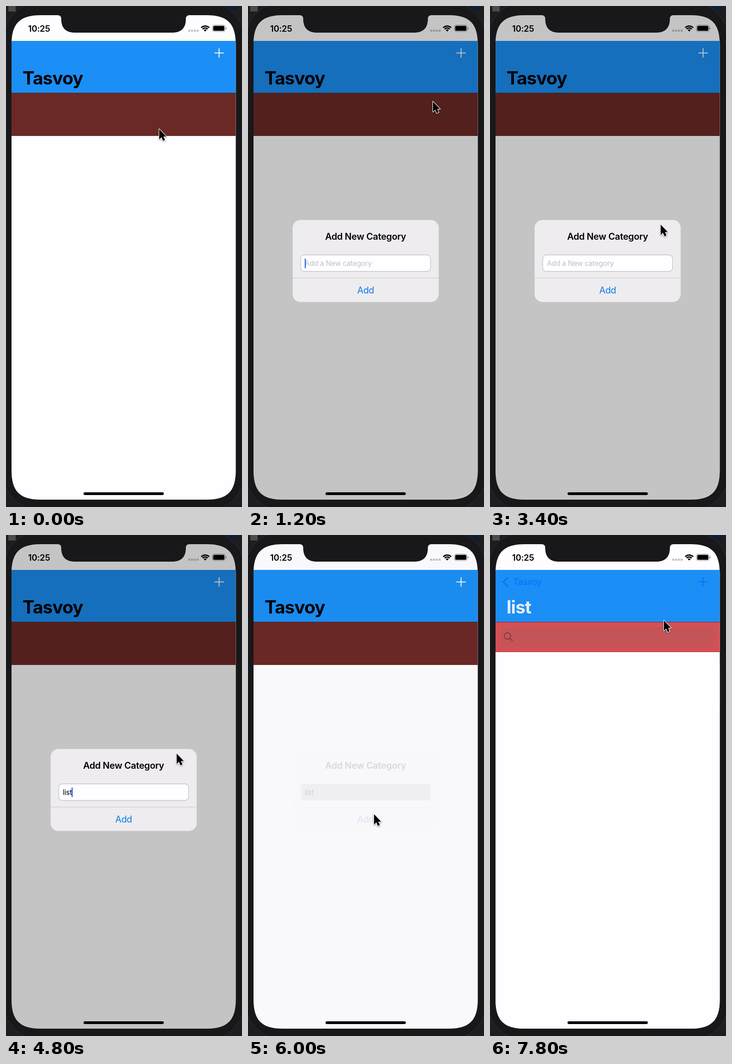
Animation, 513 px wide and 1091 px high, one loop 8000 ms. Source, as an HTML page with a canvas:

```html
<!DOCTYPE html>
<html lang="en">
<head>
<meta charset="utf-8">
<style>
  html, body { margin: 0; width: 100%; height: 100%; overflow: hidden; background: #18171a; }
  canvas { display: block; }
</style>
</head>
<body>
<canvas id="stage" width="513" height="1091"></canvas>
<script>
const ctx = document.getElementById('stage').getContext('2d');
const APP = 'Tasvoy';
const LOOP = 8000, STEP = 200;
const LEFT = 12, RIGHT = 499.5, TOP = 20, BOTTOM = 1075, WIDTH = RIGHT - LEFT;
const BLUE = '#1b8ff5', TINT = '#0672f5', RED = '#d55055', MAROON = '#6b2926', PAPER = '#fefdff';

// Pointer stops: step, x, y
const STOPS = [
  [0, 333, 267], [3, 457, 104], [5, 457, 104], [6, 402, 207], [9, 371, 475],
  [24, 371, 475], [27, 274, 607], [31, 274, 607], [34, 149, 337],
  [36, 149, 337], [39, 378, 185]
];
const mix = (a, b, p) => a + (b - a) * p;

function withState(draw) { ctx.save(); draw(); ctx.restore(); }

function rect(x, y, w, h, color) {
  ctx.fillStyle = color;
  ctx.fillRect(x, y, w, h);
}

function pill(x, y, w, h, r, fill, stroke, lineWidth = 1) {
  ctx.beginPath();
  ctx.roundRect(x, y, w, h, r);
  if (fill) { ctx.fillStyle = fill; ctx.fill(); }
  if (stroke) { ctx.strokeStyle = stroke; ctx.lineWidth = lineWidth; ctx.stroke(); }
}

function line(points, color, width) {
  ctx.beginPath();
  points.forEach(([x, y]) => ctx.lineTo(x, y));
  ctx.strokeStyle = color;
  ctx.lineWidth = width;
  ctx.stroke();
}

function text(str, x, y, size, color, { weight = 400, track = -0.01, align = 'left' } = {}) {
  ctx.font = `${weight} ${size}px Inter, "Liberation Sans", sans-serif`;
  ctx.letterSpacing = `${size * track}px`;
  ctx.textAlign = align;
  ctx.fillStyle = color;
  ctx.fillText(str, x, y);
}

function screenPath() {
  const e = 64, k = 18;
  ctx.beginPath();
  ctx.moveTo(LEFT, TOP + e);
  ctx.bezierCurveTo(LEFT, TOP + k, LEFT + k, TOP, LEFT + e, TOP);
  ctx.lineTo(112, TOP);
  ctx.quadraticCurveTo(120, TOP, 120, 28);
  ctx.bezierCurveTo(120, 48, 130, 58, 150, 58);
  ctx.lineTo(361, 58);
  ctx.bezierCurveTo(381, 58, 391, 48, 391, 28);
  ctx.quadraticCurveTo(391, TOP, 399, TOP);
  ctx.lineTo(RIGHT - e, TOP);
  ctx.bezierCurveTo(RIGHT - k, TOP, RIGHT, TOP + k, RIGHT, TOP + e);
  ctx.lineTo(RIGHT, BOTTOM - e);
  ctx.bezierCurveTo(RIGHT, BOTTOM - k, RIGHT - k, BOTTOM, RIGHT - e, BOTTOM);
  ctx.lineTo(LEFT + e, BOTTOM);
  ctx.bezierCurveTo(LEFT + k, BOTTOM, LEFT, BOTTOM - k, LEFT, BOTTOM - e);
  ctx.closePath();
}

function device() {
  rect(0, 0, 513, 1091, '#1c1d20');
  rect(420, 0, 83, 11, '#101c30');
  rect(5, 0, 16, 12, '#4b4b4e');
  pill(-6, -9, 525, 1109, 84, '#18171a', '#303034');
}

function statusBar() {
  text('10:25', 48, 55.5, 18.5, '#000', { weight: 600 });
  for (let i = 0; i < 4; i++) pill(396 + i * 6.1, 51.5, 4.6, 4.4, 1, '#c3c2c5');
  for (const r of [4.5, 9, 13.3]) {
    ctx.beginPath();
    ctx.arc(433, 55.5, r - (r < 5 ? 2.2 : 1.4), -Math.PI * 0.76, -Math.PI * 0.24);
    ctx.strokeStyle = '#000';
    ctx.lineWidth = r < 5 ? 4.4 : 2.8;
    ctx.stroke();
  }
  pill(448.7, 41.5, 27.6, 14.2, 4, null, '#8e8d90');
  pill(450.4, 43.2, 24.2, 10.8, 2.6, '#000');
  pill(477.6, 46.5, 1.7, 4.4, 1, '#8e8d90');
}

function plus(color, alpha) {
  ctx.globalAlpha = alpha;
  line([[453, 102.3], [473.5, 102.3]], color, 2);
  line([[463.2, 92], [463.2, 112.5]], color, 2);
  ctx.globalAlpha = 1;
}

function navBar(push) {
  rect(LEFT, 76, WIDTH, 113, BLUE);
  plus('#f5f9ff', 1 - push);
  plus(TINT, push);

  // The large title shrinks into the back button while the next one slides in.
  const x = mix(36, 50, push), y = mix(170.5, 109, push);
  const fade = Math.min(1, push * 1.3);
  if (push < 1) {
    ctx.globalAlpha = 1 - fade;
    text(APP, x, y, mix(39, 20, push), '#000', { weight: 700, track: -0.025 });
  }
  if (push > 0) {
    ctx.globalAlpha = push;
    text(APP, x, y, mix(39, 19.5, push), TINT, { track: -0.02 });
    line([[39, 92.5], [29, 102.5], [39, 112.5]], TINT, 2.7);
    text('list', mix(546, 36, push), 170.5, 39, '#e8eef6', { weight: 700, track: -0.025 });
  }
  ctx.globalAlpha = 1;
}

function categories(hasList, selected, push) {
  const shift = -0.3 * WIDTH * push;
  rect(LEFT, 189, WIDTH, 94, MAROON);
  rect(LEFT, 189, WIDTH, 1, 'rgba(30,20,40,.45)');
  if (!hasList) return;
  rect(LEFT, 283, WIDTH, 95, selected ? '#c7c5cd' : RED);
  text('list', 36 + shift, 337.5, 19.5, selected ? '#eae8ee' : '#f6eeee');
}

function items(push) {
  const x = (1 - push) * WIDTH;
  const edge = LEFT + x;
  if (push < 1) {
    rect(LEFT, 189, x, BOTTOM - 189, `rgba(0,0,20,${0.06 * push})`);
    const shadow = ctx.createLinearGradient(edge - 11, 0, edge, 0);
    shadow.addColorStop(0, 'rgba(0,0,20,0)');
    shadow.addColorStop(1, 'rgba(0,0,20,.05)');
    rect(edge - 11, 189, 11, BOTTOM - 189, shadow);
  }
  withState(() => {
    ctx.translate(x, 0);
    rect(LEFT, 189, WIDTH, BOTTOM - 189, PAPER);
    rect(LEFT, 189, WIDTH, 66, RED);
    rect(LEFT, 189, WIDTH, 1.5, 'rgba(70,40,80,.55)');
    rect(LEFT, 254, WIDTH, 1, 'rgba(110,30,40,.4)');
    pill(22, 201, 468, 43, 13, '#c45458');
    ctx.beginPath();
    ctx.arc(38, 220, 7, 0, 7);
    ctx.strokeStyle = '#84343b';
    ctx.lineWidth = 1.8;
    ctx.stroke();
    line([[43, 225], [49, 230.5]], '#84343b', 2);
  });
}

function alertBox(step, alpha) {
  const closing = step >= 30;
  const pressed = step === 29;
  const typed = 'list'.slice(0, Math.max(0, step - 19));
  const caretOn = !closing && (step >= 20 || (step - 4) % 5 < 3);
  withState(() => {
    ctx.globalAlpha = alpha;
    if (!closing) {
      const scale = 1 + 0.15 * (1 - alpha);
      ctx.translate(255.7, 555);
      ctx.scale(scale, scale);
      ctx.translate(-255.7, -555);
    }
    pill(97, 466, 317.5, 178.5, 17, '#eeecef');
    if (pressed) pill(97, 592, 317.5, 52.5, [0, 0, 17, 17], '#d5d4d5');
    rect(97, 592, 317.5, 1, '#c6c5c9');
    text('Add New Category', 255.7, 508.5, 19.8, '#000', { weight: 600, track: -0.014, align: 'center' });
    pill(114.7, 542, 282, 36, 7.5, closing ? '#b0afb3' : PAPER, closing ? null : '#c5c4c8', 1.3);
    if (typed) text(typed, 123.5, 566.2, 15.5, '#000', { track: -0.015 });
    else text('Add a New category', 123.5, 566.2, 15.5, '#c0bfc4', { track: -0.015 });
    if (caretOn) {
      const advance = typed ? ctx.measureText(typed).width - 0.6 : 0;
      pill(123.2 + advance, 550, 2.6, 21, 1.2, '#3273dc');
    }
    text('Add', 255.7, 626, 19.6, '#0a7bea', { track: -0.02, align: 'center' });
  });
}

function pointerAt(step) {
  const i = STOPS.findIndex(stop => stop[0] >= step);
  const b = STOPS[i], a = STOPS[Math.max(0, i - 1)];
  const p = b === a ? 0 : (step - a[0]) / (b[0] - a[0]);
  const ease = p * p * (3 - 2 * p);
  return [mix(a[1], b[1], ease), mix(a[2], b[2], ease)];
}

function pointer(step) {
  withState(() => {
    ctx.translate(...pointerAt(step));
    const arrow = new Path2D('M0 1V23.5L5 18.8L8.4 26.6L12.6 24.8L9.3 17.3H15.5Z');
    ctx.lineWidth = 2.2;
    ctx.lineJoin = 'round';
    ctx.strokeStyle = '#fff';
    ctx.shadowColor = 'rgba(0,0,0,.4)';
    ctx.shadowBlur = 3;
    ctx.shadowOffsetY = 1.5;
    ctx.stroke(arrow);
    ctx.shadowColor = 'transparent';
    ctx.fillStyle = '#000';
    ctx.fill(arrow);
  });
}

function alertAlpha(step) {
  if (step < 4 || step > 30) return 0;
  return step === 4 ? 0.6 : step === 30 ? 0.125 : 1;
}

function pushProgress(step) {
  if (step < 35) return 0;
  return step === 35 ? 0.125 : step === 36 ? 0.82 : 1;
}

function draw(step) {
  const alpha = alertAlpha(step);
  const push = pushProgress(step);
  device();
  withState(() => {
    screenPath();
    ctx.fillStyle = PAPER;
    ctx.fill();
    ctx.clip();
    categories(step >= 31, step >= 35, push);
    if (push > 0) items(push);
    navBar(push);
    statusBar();
    if (alpha) {
      rect(LEFT, TOP, WIDTH, BOTTOM - TOP, `rgba(0,0,0,${step === 30 ? 0.02 : 0.227 * alpha})`);
      alertBox(step, alpha);
    }
    pill(168.5, 1059, 174.5, 6, 3, '#000');
  });
  pointer(step);
}

const start = performance.now();
function tick() {
  const elapsed = (performance.now() - start) % LOOP;
  draw(Math.floor(elapsed / STEP));
  requestAnimationFrame(tick);
}
tick();
</script>
</body>
</html>
```
